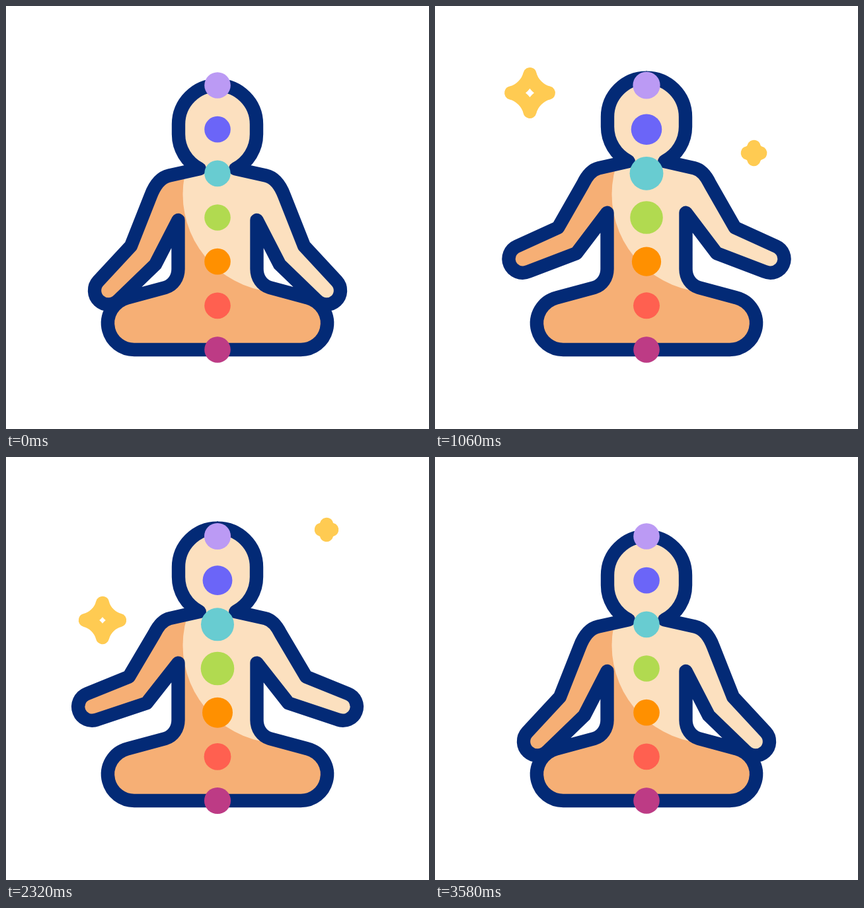
Animation, 640 px wide and 640 px high, one loop 3.6 s. Source, as an HTML page with a canvas:

```html
<!DOCTYPE html>
<html lang="en">
<head>
<meta charset="utf-8">
<title>Meditation</title>
<style>
  html, body { margin: 0; width: 100%; height: 100%; overflow: hidden; background: #fff; }
  canvas { display: block; width: 640px; height: 640px; }
</style>
</head>
<body>
<canvas id="stage" width="640" height="640"></canvas>
<script>
const ctx = document.getElementById('stage').getContext('2d');
const LOOP = 3600;
const NAVY = '#032a76', SKIN = '#fce0bf', SHADE = '#f6af75', GOLD = '#ffcb52';
const DOTS = ['#bb9af4', '#6b65f8', '#68ccd1', '#b1da50', '#ff9000', '#ff6050', '#bd3b85'];
const STARS = [
  { x: 482.5, y: 222.5, start: 185 },
  { x: 143.5, y: 131.5, start: 730 },
  { x: 485, y: 110, start: 1429 },
  { x: 146, y: 247, start: 2010 }
];
const STAR_HALF_TIME = 520;

const clamp = v => Math.min(1, Math.max(0, v));
const lerp = (a, b, k) => a + (b - a) * k;
const smooth = v => { v = clamp(v); return v * v * (3 - 2 * v); };

// Cubic-bezier easing (a, 0, 1 - a, 1)
function ease(v, a = 0.55) {
  v = clamp(v);
  let lo = 0, hi = 1;
  for (let i = 0; i < 20; i++) {
    const s = (lo + hi) / 2, r = 1 - s;
    if (3 * r * r * s * a + 3 * r * s * s * (1 - a) + s * s * s < v) lo = s; else hi = s;
  }
  return smooth(lo);
}

// Rises from 0 to 1 and returns, each way lasting `half`
const bump = (time, half) => smooth(1 - Math.abs(time / half - 1));

// Left half of the outline, from crown to seat; k is how far the arms are raised
function halfBody(k) {
  const path = new Path2D();
  const at = (x0, y0, x1, y1) => [lerp(x0, x1, k), lerp(y0, y1, k)];
  const lift = 14 * k;
  const [hx, hy] = at(155, 430.5, 127, 371);
  const turn = lerp(222.8, 252.4, k) * Math.PI / 180;

  path.moveTo(321, 120 - lift);
  path.arc(320, 179 - lift, 59, -Math.PI / 2, -Math.PI, true);
  path.arc(320, 194 - lift, 59, Math.PI, 2.05, true);
  path.lineTo(...at(247, 256.5, 248, 242.5));
  path.quadraticCurveTo(...at(229, 260.5, 235, 245.5), ...at(219, 287, 225, 265));
  path.lineTo(...at(189, 363, 185.5, 328.5));
  path.arc(hx, hy, 21, turn, turn - Math.PI, true);
  path.lineTo(...at(226, 391, 211, 370));
  path.lineTo(260.5, 324 - lift);
  path.lineTo(260.5, 398);
  path.bezierCurveTo(260.5, 411, 253, 422.5, 241, 426);
  path.lineTo(184, 441.3);
  path.arc(194, 480, 40, -1.823, Math.PI / 2, true);
  path.lineTo(321, 520);
  return path;
}

function mirror() {
  ctx.translate(640, 0);
  ctx.scale(-1, 1);
}

function bothSides(draw) {
  for (const flipped of [false, true]) {
    ctx.save();
    if (flipped) mirror();
    draw(flipped);
    ctx.restore();
  }
}

function paintLight(k) {
  ctx.fillStyle = SKIN;
  ctx.beginPath();
  ctx.arc(415.5, 285, 148, 0, Math.PI * 2);
  ctx.fill();
  ctx.fillRect(240, 80, 170, 165 - 14 * k);
  ctx.beginPath();
  for (const [x, y] of [[400, 80], [640, 80], [640, 452], [490, 452], [400, 432]]) ctx.lineTo(x, y);
  ctx.fill();
}

function drawBody(k) {
  const half = halfBody(k);
  bothSides(flipped => {
    ctx.clip(half);
    if (flipped) mirror();
    ctx.fillStyle = SHADE;
    ctx.fillRect(0, 0, 640, 640);
    paintLight(k);
  });
  ctx.strokeStyle = NAVY;
  bothSides(() => ctx.stroke(half));
}

function drawStar({ x, y, start }, time) {
  const r = 40.5 * bump(time - start, STAR_HALF_TIME);
  if (r <= 0) return;
  ctx.save();
  ctx.translate(x, y);
  ctx.beginPath();
  ctx.moveTo(0, -r);
  for (let i = 0; i < 4; i++) {
    const c = Math.cos(i * Math.PI / 2), s = Math.sin(i * Math.PI / 2);
    const spin = (px, py) => [r * (px * c - py * s), r * (px * s + py * c)];
    ctx.bezierCurveTo(...spin(0.11, -0.53), ...spin(0.53, -0.11), ...spin(1, 0));
  }
  ctx.closePath();
  ctx.strokeStyle = GOLD;
  ctx.stroke();
  ctx.restore();
}

function drawDots(time) {
  DOTS.forEach((color, i) => {
    const local = time - i * 200;
    const pulse = local > 0 && local < 2400 ? bump(local % 1200, 600) : 0;
    ctx.fillStyle = color;
    ctx.beginPath();
    ctx.arc(320, 120 + i * 200 / 3, 19.8 + 5.8 * pulse, 0, Math.PI * 2);
    ctx.fill();
  });
}

function render(now) {
  const time = now % LOOP;
  ctx.fillStyle = '#fff';
  ctx.fillRect(0, 0, 640, 640);
  ctx.lineWidth = 20.4;
  ctx.lineJoin = 'round';
  drawBody(ease(time / 1610) - ease((time - 1960) / 1320));
  STARS.forEach(star => drawStar(star, time));
  drawDots(time);
}

let begin;
function tick(now) {
  begin ??= now;
  render(now - begin);
  requestAnimationFrame(tick);
}
render(0);
requestAnimationFrame(tick);
</script>
</body>
</html>
```
